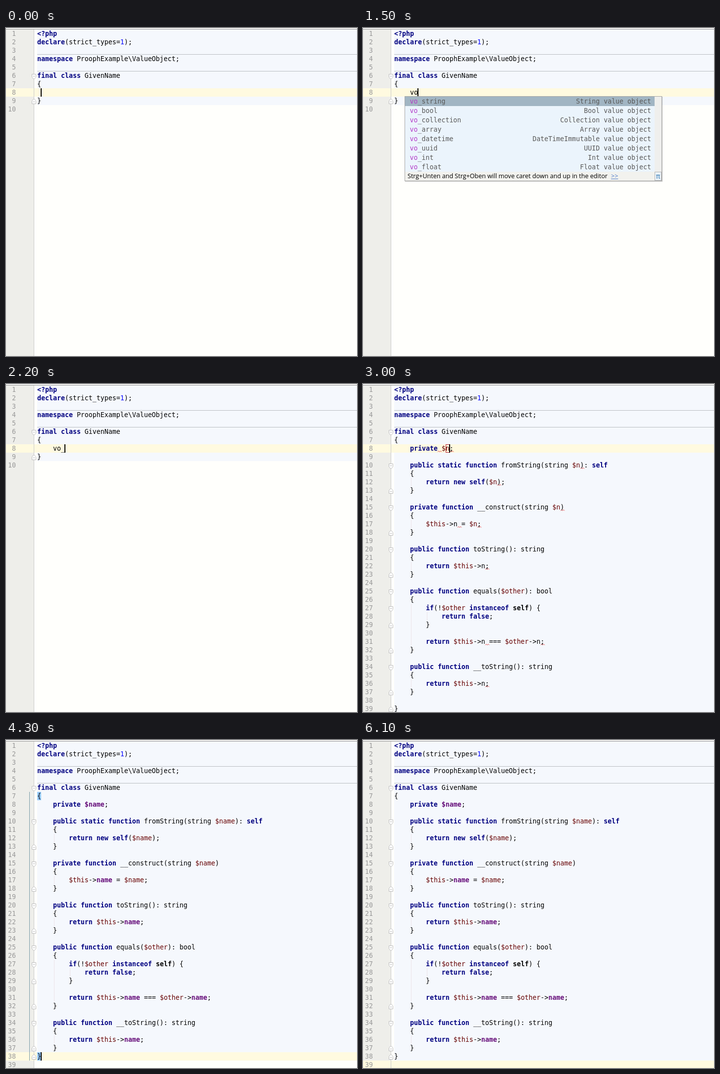
Write an HTML page that moves like this. It is 709x664 px and loops after 6600 ms.

```html
<!DOCTYPE html>
<html lang="en">
<head>
<meta charset="utf-8">
<title>Value object live template</title>
<style>
html, body { margin: 0; width: 100%; height: 100%; overflow: hidden; background: #fffffc; }
#stage { position: relative; width: 709px; height: 664px; overflow: hidden; font: 13.288px/17px "DejaVu Sans Mono", monospace; color: #000; }
#stage i, #stage svg, pre, #popup, #popup > * { position: absolute; }
svg { left: 0; top: 0; }
pre { margin: 0; top: 3px; font: inherit; }
#code { left: 63px; }
#nums { left: 0; width: 20px; text-align: right; color: #999; }
b { color: #000080; }
b.plain { color: #000; }
b.field { color: #660e7a; }
.var { color: #660000; }
.num { color: #0000ff; }
#popup { left: 84px; top: 138px; width: 518px; height: 170px; border: 1px solid #a5a5a5; background: #ebf4fc; box-shadow: 1px 1px 1px #0003; line-height: 19px; color: #595959; white-space: pre; }
.row { left: 0; width: 504px; height: 19px; }
.row:first-child { background: #a1b5c3; }
.row span { position: absolute; left: 9.5px; }
.row span + span { left: auto; right: 7px; }
.row em { font-style: normal; color: #b33bc8; }
.bar { left: 504px; top: 0; width: 14px; height: 152px; background: #efefed; }
.hint { left: 0; top: 152px; width: 518px; height: 18px; background: #f2f2ee; color: #000; font: 12.57px/18px "Open Sans", "Noto Sans", sans-serif; }
.hint span { position: absolute; left: 5px; }
.hint u { position: absolute; left: 416px; color: #4a78c8; }
.pi { left: 504px; top: 152px; box-sizing: border-box; width: 14px; height: 18px; border: 1px solid #b4b4b4; background: #eaf2f8; color: #3c7fb5; font: 14px/16px "DejaVu Sans", sans-serif; text-align: center; }
</style>
</head>
<body>
<div id="stage"></div>
<script>
const X = 63, CW = 8, LH = 17;
const top_ = line => 3 + LH * (line - 1);
const col = c => X + CW * c;

const head = `<?php
declare(strict_types=1);

namespace ProophExample\\ValueObject;

final class GivenName
{
`;

// "~" is the template variable, "^" precedes a character with an error mark
const body = `    private^ $~^;

    public static function fromString(string $~^): self
    {
        return new self($~^);
    }

    private function __construct(string $~^)
    {
        $this->~^ = $~^;
    }

    public function toString(): string
    {
        return $this->~^;
    }

    public function equals($other): bool
    {
        if(!$other instanceof self) {
            return false;
        }

        return $this->~^ === $other->~^;
    }

    public function __toString(): string
    {
        return $this->~^;
    }
`;

const options = ["string", "bool", "collection", "array", "datetime", "uuid", "int", "float"];
const kinds = { datetime: "DateTimeImmutable", uuid: "UUID" };
const starts = [10, 15, 20, 25, 27, 34], ends = [13, 18, 23, 29, 32, 37];
const guides = [[12, 1, 4], [17, 1, 4], [22, 1, 4], [27, 5, 4], [28, 1, 8], [36, 1, 4]];

const full = { full: true, name: "name", fields: true };
const last = { ...full, cut: true, row: 39 };
const states = [
  { t: 0, typed: " ", row: 8, caret: 1 },
  { t: 200, typed: "", row: 8, caret: 0 },
  { t: 700, typed: "", row: 8, caret: 4 },
  { t: 1500, typed: "    vo", row: 8, caret: 6, match: 2 },
  { t: 1800, typed: "    vo_", row: 8, caret: 7, match: 3 },
  { t: 2200, typed: "    vo_", row: 8, caret: 7 },
  { t: 2300, full: true, name: "", row: 8, caret: 13, raw: true, edit: true },
  ...["", "n", "na", "nam"].map((name, i) => (
    { t: i ? 2900 + 100 * i : 2500, full: true, name, row: 8, caret: 13 + i, errors: true, edit: true })),
  { ...full, t: 3300, row: 8, caret: 17, edit: true, usages: true },
  { ...full, t: 3600, row: 38, caret: 4 },
  { ...full, t: 4300, cut: true, row: 38, caret: 1, braces: true },
  { ...last, t: 4400, caret: 0 },
  { ...last, t: 5200 },
  { ...last, t: 5500, caret: 0 },
  { ...last, t: 6100 }
];

const esc = s => s.replace(/&/g, "&amp;").replace(/</g, "&lt;").replace(/>/g, "&gt;");
const box = (x, y, w, h, fill, more = "") =>
  `<i style="left:${x}px;top:${y}px;width:${w}px;height:${h}px;background:${fill};${more}"></i>`;
const path = (d, stroke, fill = "none") => `<path d="${d}" stroke="${stroke}" fill="${fill}"/>`;

const token = /<\?php|\$\w*|->\w*|: self|instanceof self|\b(?:declare|namespace|final|class|private|public|static|function|return|new|self|if|instanceof|false)\b|\d+|[<>&]/g;

function paint(line, s) {
  return line.replace(token, m => {
    if (m[0] === "$") {
      return s.fields && /private \$/.test(line)
        ? `<b class="field">${m}</b>` : `<span class="var">${m}</span>`;
    }
    if (m.startsWith("->")) {
      return "-&gt;" + (s.fields ? `<b class="field">${m.slice(2)}</b>` : m.slice(2));
    }
    if (m === ": self") return s.raw ? m : ": <b>self</b>";
    if (m === "instanceof self") return "<b>instanceof</b> " + (s.raw ? "self" : '<b class="plain">self</b>');
    if (/^\d/.test(m)) return `<span class="num">${m}</span>`;
    return m.length > 1 ? `<b>${esc(m)}</b>` : esc(m);
  });
}

function fold(line, up) {
  const y = top_(line) + 5.5;
  return up
    ? path(`M52.5 ${y + 9}h8v-6l-3-3.5h-2l-3 3.5zM54.5 ${y + 5}h4`, "#bdbdbd", "#fff")
    : path(`M52.5 ${y}h8v6l-3 3.5h-2l-3 -3.5zM54.5 ${y + 4}h4`, "#bdbdbd", "#fff");
}

// Background of the variable wherever it is used as a field
function usages(lines) {
  let out = box(col(12), top_(8), 40, 16, "#fbdff7");
  lines.forEach((text, i) => {
    for (const m of text.matchAll(/->name/g)) {
      out += box(col(m.index + 2), top_(i + 1), 32, 16, i === 16 ? "#fbdff7" : "#e3e0fb");
    }
  });
  return out;
}

function popup(match) {
  const rows = options.map((o, i) => {
    const word = "vo_" + o, kind = kinds[o] || o[0].toUpperCase() + o.slice(1);
    return `<div class="row" style="top:${19 * i}px"><span><em>${word.slice(0, match)}</em>${word.slice(match)}</span><span>${kind} value object</span></div>`;
  });
  return `<div id="popup">${rows.join("")}<div class="bar"></div>
<div class="hint"><span>Strg+Unten and Strg+Oben will move caret down and up in the editor</span><u>&gt;&gt;</u></div><div class="pi">π</div></div>`;
}

function render(s) {
  const middle = s.full ? body.replaceAll("~", s.name) + (s.cut ? "" : "\n") : s.typed + "\n";
  const marked = (head + middle + "}\n").split("\n");
  const lines = marked.map(l => l.replaceAll("^", ""));
  const end = lines.length - 1, rowY = top_(s.row);

  let html = box(0, 0, 57, 664, "#eeeeea") + box(X, 3, 646, LH * end, "#f5f8fd") +
    box(0, rowY, 709, LH, "#fffae0") + box(56, 3, 1, 661, "#cacaca") +
    box(0, 0, 709, 2, "#fafaf8") + box(0, 2, 709, 1, "#929292") +
    box(X, 53, 646, 1, "#b9bdc1") + box(X, 87, 646, 1, "#b9bdc1");

  let marks = fold(6) + fold(end, true);
  if (s.full && !s.raw) {
    marks += starts.map(l => fold(l)).join("") + ends.map(l => fold(l, true)).join("");
    html += guides.map(([l, n, c]) => box(col(c) + 2, top_(l), 1, LH * n, "#ebe3e8")).join("");
  }
  if (s.errors) {
    marked.forEach((text, i) => text.split("^").slice(0, -1).reduce((at, part) => {
      at += part.length;
      marks += path(`M${col(at)} ${top_(i + 1) + 15.5}l2-2 2 2 2-2 2 2`, "#e04040");
      return at;
    }, 0));
  }
  if (s.usages) html += usages(lines);
  if (s.braces) {
    html += box(X, top_(7), 8, LH, "#99ccff") + box(X, rowY, 8, LH, "#99ccff") +
      box(47, 105, 1, 544, "#7a9ca8");
  }

  html += `<svg width="709" height="664">${marks}</svg>`;
  html += `<pre id="nums">${lines.map((_, i) => i + 1).join("\n")}</pre>`;
  html += `<pre id="code">${lines.map(l => paint(l, s)).join("\n")}</pre>`;
  if (s.edit) html += box(col(13), rowY, CW * s.name.length + 1, LH, "none", "box-sizing:border-box;border:1px solid #b8202c");
  if (s.caret !== undefined) html += box(col(s.caret) - (s.caret ? 1 : 0), rowY, 2, LH, "#000");
  return html + (s.match ? popup(s.match) : "");
}

const stage = document.getElementById("stage");
let shown;
function tick() {
  const t = performance.now() % 6600;
  const s = states.findLast(k => k.t <= t);
  if (s !== shown) stage.innerHTML = render(shown = s);
  requestAnimationFrame(tick);
}
tick();
</script>
</body>
</html>
```
